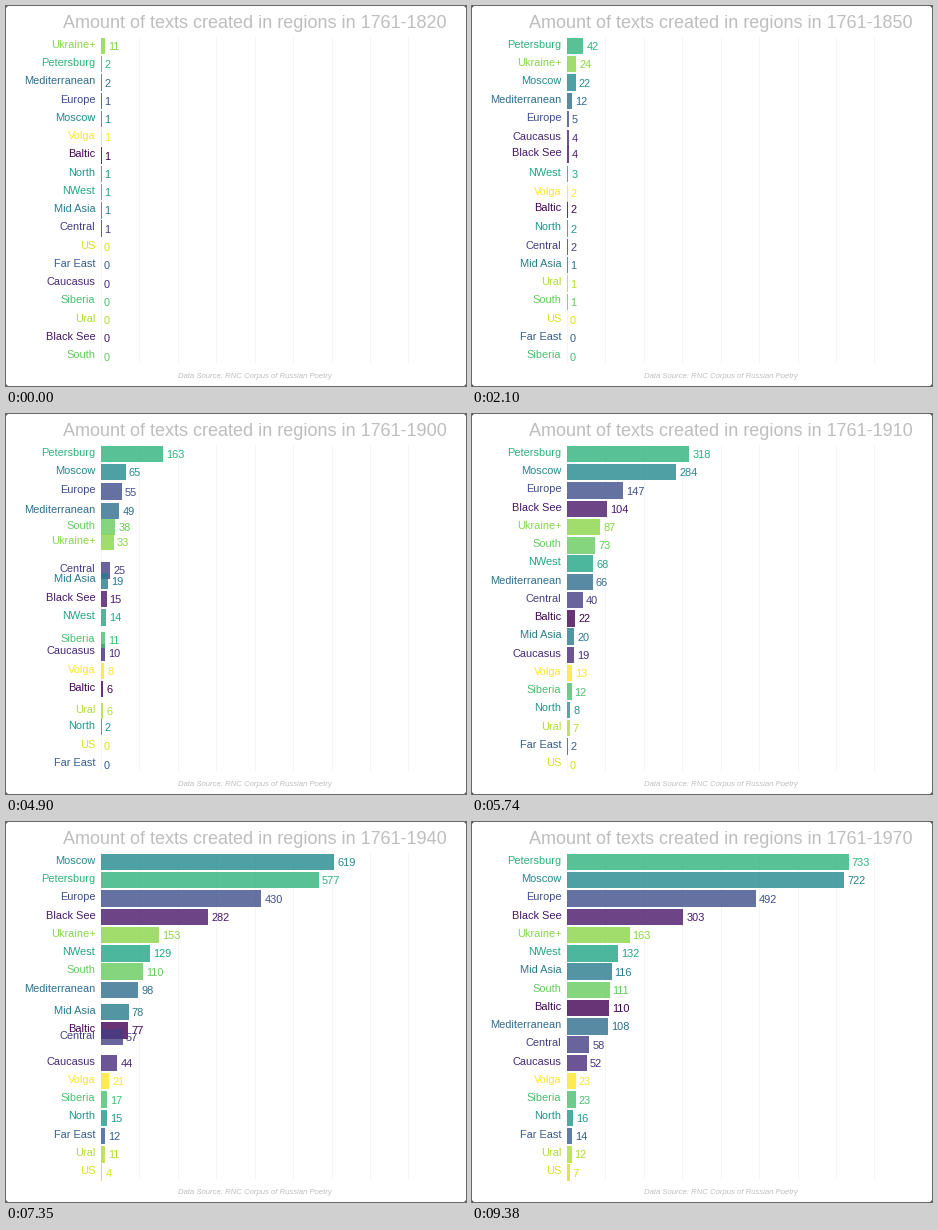
Recreate the animation shown at these times as a matplotlib script. Size 460 by 380 pixels, loop 9.45 s.

```python
import numpy as np
import matplotlib.pyplot as plt
from matplotlib.animation import FuncAnimation
from matplotlib.patches import FancyBboxPatch, Rectangle

W, H, DPI = 460, 380, 80
FRAMES, STEP = 135, 70
X0, UNIT = 95, 0.3842           # bar origin, pixels per text
TOP, ROW = 40, 18.27            # centre of first bar, row pitch
YEARS = np.arange(1820, 1971, 10)
KEYS = (1820, 1850, 1880, 1900, 1920, 1950, 1970)

# Cumulative counts at KEYS; the listing order also settles ties.
COUNTS = {
    "Ukraine+": (11, 24, 29, 33, 141, 159, 163),
    "Petersburg": (2, 42, 84, 163, 474, 629, 733),
    "Mediterranean": (2, 12, 22, 49, 84, 105, 108),
    "Europe": (1, 5, 21, 55, 239, 491, 492),
    "Moscow": (1, 22, 31, 65, 503, 677, 722),
    "Volga": (1, 2, 3, 8, 18, 23, 23),
    "Baltic": (1, 2, 2, 6, 38, 109, 110),
    "North": (1, 2, 2, 2, 14, 16, 16),
    "NWest": (1, 3, 5, 14, 123, 132, 132),
    "Mid Asia": (1, 1, 19, 19, 20, 104, 116),
    "Central": (1, 2, 2, 25, 56, 58, 58),
    "US": (0, 0, 0, 0, 0, 6, 7),
    "Far East": (0, 0, 0, 0, 3, 13, 14),
    "Caucasus": (0, 4, 5.2, 10, 28, 52, 52),
    "Siberia": (0, 0, 0, 11, 13, 18, 23),
    "Ural": (0, 1, 1, 6, 8, 12, 12),
    "Black See": (0, 4, 5, 15, 193, 300, 303),
    "South": (0, 1, 14, 38, 108, 111, 111),
}
# Decades that depart from a straight line between KEYS.
EXTRA = {
    1860: {"South": 1, "Mid Asia": 1, "Volga": 2},
    1870: {"South": 13, "Europe": 12, "Mid Asia": 11, "Black See": 5,
           "Volga": 2, "Baltic": 2.1},
    1890: {"Europe": 30, "Mediterranean": 25, "Central": 3, "Siberia": 3,
           "North": 2, "Ural": 2},
    1930: {"Europe": 370, "Black See": 265, "Mid Asia": 52, "Baltic": 45,
           "Caucasus": 36, "Siberia": 16, "Far East": 10},
}
NAMES = list(COUNTS)


def series(name):
    points = dict(zip(KEYS, COUNTS[name]))
    points.update({y: d[name] for y, d in EXTRA.items() if name in d})
    xs = sorted(points)
    return np.interp(YEARS, xs, [points[x] for x in xs])


values = np.array([series(n) for n in NAMES]).T
ranks = np.argsort(np.argsort(-values, axis=1, kind="stable"), axis=1)

# First and last frame of each move from one decade to the next.
MOVES = [(9 * k + 1, 9 * k + 9) for k in range(10)]
MOVES += [(93, 100), (100, 108), (109, 116), (117, 124), (125, 133)]


def cubic(t):
    return 4 * t ** 3 if t < 0.5 else 1 - 4 * (1 - t) ** 3


def progress(frame):
    """Index of the current move and the linear share of it done."""
    k = max([i for i, (a, _) in enumerate(MOVES) if a <= frame], default=0)
    a, b = MOVES[k]
    return k, min(max((frame - a) / (b - a), 0), 1)


plt.rcParams["font.family"] = "Liberation Sans"
fig = plt.figure(figsize=(W / DPI, H / DPI), dpi=DPI, facecolor="#555555")
ax = fig.add_axes([0, 0, 1, 1])
ax.set(xlim=(0, W), ylim=(H, 0))
ax.axis("off")
ax.add_patch(FancyBboxPatch((0, 0), W, H, fc="white", ec="none", zorder=0,
                            boxstyle="round,pad=0,rounding_size=3"))


def text(x, y, s, px, color, ha="center", **kw):
    return ax.text(x, y, s, fontsize=px * 72 / DPI, color=color, ha=ha,
                   va="baseline", **kw)


for i in range(9):
    x = X0 + 100 * i * UNIT
    ax.plot([x, x], [31, 357], color="#f5f5f5", lw=72 / DPI, zorder=1)

title = text(248.5, 22, "", 18, "#bebebe")
text(248.5, 372, "Data Source: RNC Corpus of Russian Poetry", 7.7, "#bebebe",
     style="italic")

palette = sorted(NAMES, key=str.lower)
bars, tags, nums = [], [], []
for name in NAMES:
    pos = palette.index(name)
    color = plt.cm.viridis(pos / (len(NAMES) - 1))
    bar = Rectangle((X0, 0), 0, 0.9 * ROW, fc=color, ec="none", alpha=0.8,
                    zorder=2 + pos / 100)
    bars.append(ax.add_patch(bar))
    tags.append(text(89.3, 0, name, 11, color, "right"))
    nums.append(text(0, 0, "", 11, color, "left"))


def draw(frame):
    k, t = progress(frame)
    e = cubic(t)
    near = k + (t >= 0.5)
    title.set_text(f"Amount of texts created in regions in 1761-{YEARS[near]}")
    now = values[k] + (values[k + 1] - values[k]) * e
    rows = TOP + ROW * (ranks[k] + (ranks[k + 1] - ranks[k]) * e)
    for bar, tag, num, v, y, shown in zip(bars, tags, nums, now, rows,
                                          values[near]):
        width = v * UNIT
        bar.set_y(y - 0.45 * ROW)
        bar.set_width(max(width, min(v, 1)))
        tag.set_y(y + 1.7)
        num.set_position((X0 + width + 3, y + 4))
        num.set_text(str(int(round(shown))))
    return [title, *bars, *tags, *nums]


anim = FuncAnimation(fig, draw, frames=FRAMES, interval=STEP, repeat=True,
                     repeat_delay=0, blit=False)
plt.show()
```
